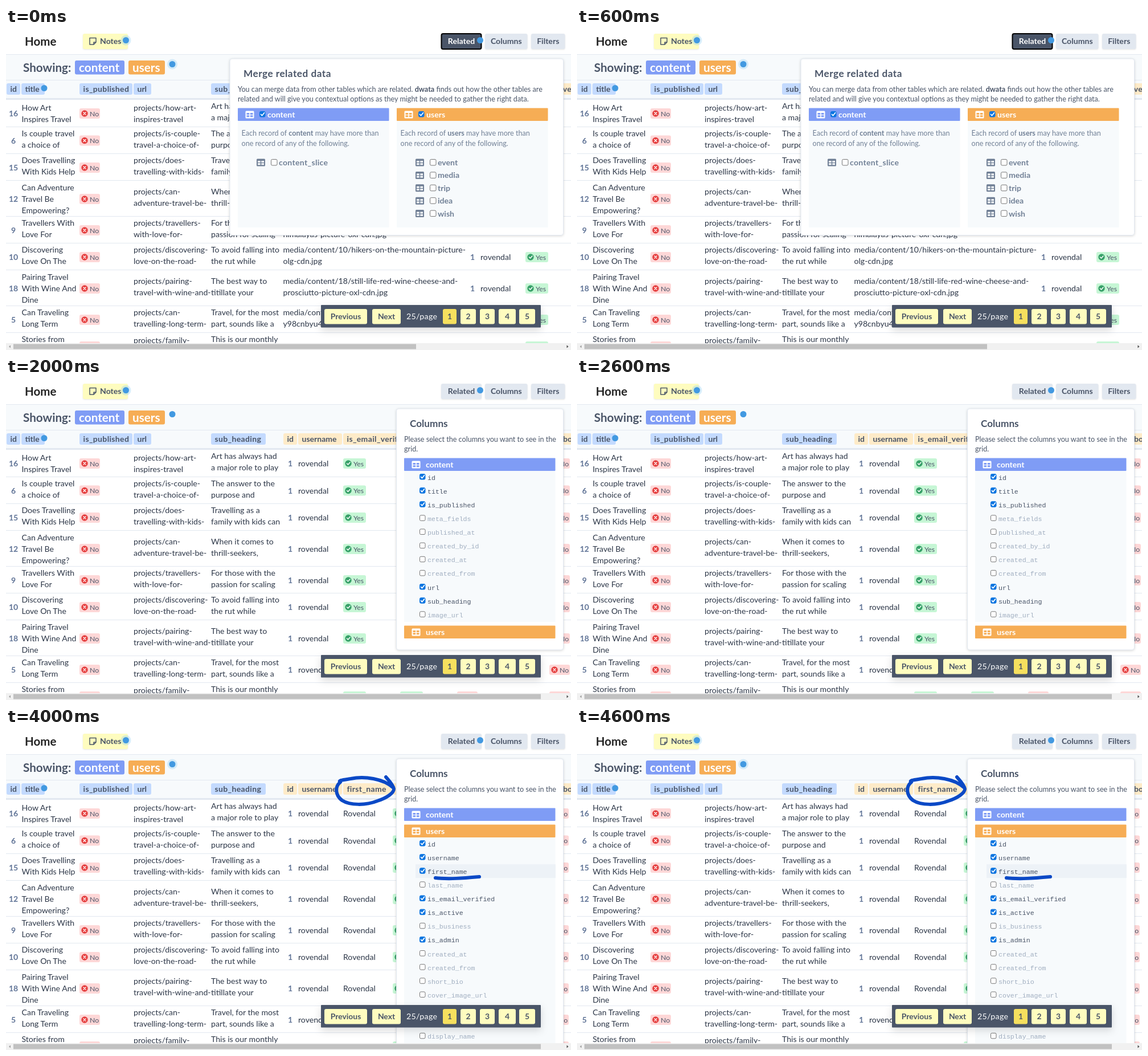
Recreate the animation shown at these times as an HTML page. Size 992 px wide and 565 px high, loop 5 s.

```html
<!DOCTYPE html>
<html lang="en">
<head>
<meta charset="utf-8">
<title>Data grid</title>
<style>
html, body { margin: 0; width: 100%; height: 100%; overflow: hidden; background: #fff; }
svg { display: block; width: 992px; height: 565px; }
text { font-family: Lato, "Open Sans", sans-serif; white-space: pre; }
.mono { font-family: "Liberation Mono", "Courier New", monospace; }
.card { filter: drop-shadow(0 1px 2px rgba(0, 0, 0, .16)); }
.lift { filter: drop-shadow(0 5px 7px rgba(0, 0, 0, .14)); }
.soft { filter: drop-shadow(0 1px 1px rgba(0, 0, 0, .1)); }
</style>
</head>
<body>
<svg id="stage" viewBox="0 0 992 565"></svg>
<script>
const INK = '#2d3748', SLATE = '#4a5568', GREY = '#718096', FADED = '#a0aec0';
const LINE = '#e2e8f0', PALE = '#f7fafc', BLUE = '#c3dafe', SAND = '#feebc8';
const INDIGO = '#7f9cf5', ORANGE = '#f6ad55', CREAM = '#fefcbf', PEN = '#0b49c6';
const USER = 'rovendal', USER_NAME = 'Rovendal';

// centre, id, title lines, url lines, sub heading lines
const rows = [
  [150, 16, 'How Art|Inspires Travel', 'projects/how-art-|inspires-travel', 'Art has always had|a major role to play'],
  [197.5, 6, 'Is couple travel|a choice of', 'projects/is-couple-|travel-a-choice-of-', 'The answer to the|purpose and'],
  [245, 15, 'Does Travelling|With Kids Help', 'projects/does-|travelling-with-kids-', 'Travelling as a|family with kids can'],
  [300, 12, 'Can Adventure|Travel Be|Empowering?', 'projects/can-|adventure-travel-be-', 'When it comes to|thrill-seekers,'],
  [355, 9, 'Travellers With|Love For', 'projects/travellers-|with-love-for-', 'For those with the|passion for scaling'],
  [402, 10, 'Discovering|Love On The', 'projects/discovering-|love-on-the-road-', 'To avoid falling into|the rut while'],
  [457, 18, 'Pairing Travel|With Wine And|Dine', 'projects/pairing-|travel-with-wine-and-', 'The best way to|titillate your'],
  [512, 5, 'Can Traveling|Long Term', 'projects/can-|travelling-long-term-', 'Travel, for the most|part, sounds like a'],
  [559, '', 'Stories from', 'projects/family-', 'This is our monthly']
];
const images = {
  4: '|himalayas-picture-oxl-cdn.jpg',
  5: 'media/content/10/hikers-on-the-mountain-picture-|olg-cdn.jpg',
  6: 'media/content/18/still-life-red-wine-cheese-and-|prosciutto-picture-oxl-cdn.jpg',
  7: 'media/content/5/|y98cnbyu4r'
};
const contentFields = 'id title is_published meta_fields published_at created_by_id created_at created_from url sub_heading image_url'.split(' ');
const userFields = 'id username first_name last_name is_email_verified is_active is_business is_admin created_at created_from short_bio cover_image_url avatar_url time_zone display_name'.split(' ');

const rect = (x, y, w, h, fill, r = 0, extra = '') =>
  `<rect x="${x}" y="${y}" width="${w}" height="${h}" rx="${r}" fill="${fill}" ${extra}/>`;
const circle = (x, y, r, fill, extra = '') => `<circle cx="${x}" cy="${y}" r="${r}" fill="${fill}" ${extra}/>`;
const path = (d, color, width) =>
  `<path d="${d}" fill="none" stroke="${color}" stroke-width="${width}" stroke-linecap="round" stroke-linejoin="round"/>`;
const text = (x, y, str, size = 14.1, fill = INK, extra = '') =>
  `<text x="${x}" y="${y}" font-size="${size}" fill="${fill}" ${extra}>${str}</text>`;
const bold = (x, y, str, size = 14, fill = SLATE, gap = 0, extra = '') =>
  text(x, y, str, size, fill, `font-weight="700" letter-spacing="${gap}" ${extra}`);
const mid = 'text-anchor="middle"';
const lines = (x, y, str, step = 20, size, fill) =>
  str.split('|').map((s, i) => text(x, y + i * step, s, size, fill)).join('');

function dot(x, y, halo) {
  return (halo ? circle(x, y, 9, '#90cdf4', 'opacity=".35"') : '') + circle(x, y, 5.5, '#4299e1');
}

function button(x, w, label, fill, color = SLATE) {
  return rect(x, 10, w, 27, fill, 3, 'class="soft"') + bold(x + w / 2, 28, label, 14.1, color, 0, mid);
}

function pill(x, y, yes) {
  const icon = yes ? `M${x + 6.5} ${y}l2 2 3.5-4` : `M${x + 7} ${y - 2}l4 4m0-4l-4 4`;
  return rect(x, y - 9, yes ? 40 : 36, 18, yes ? '#c6f6d5' : '#fed7d7', 3) +
    circle(x + 9, y, 5.7, yes ? '#38a169' : '#e53e3e') + path(icon, '#fff', 1.5) +
    text(x + 18, y + 4.5, yes ? 'Yes' : 'No', 12.3, SLATE);
}

function head(x, w, label, fill) {
  const gap = label.includes('_') ? .35 : 0;
  return rect(x, 97, w, 20, fill, 3) + bold(x + 6.5, 112, label, 14, SLATE, gap);
}

function tableIcon(x, y, fill, hole) {
  let s = rect(x, y - 6.5, 15, 13, fill, 1.5);
  for (const dx of [2, 8.3]) for (const dy of [-3, 1.2]) s += rect(x + dx, y + dy, 4.7, 3, hole);
  return s;
}

function checkbox(x, y, on, size = 10) {
  const box = rect(x + .5, y - size / 2, size - .5, size - .5, on ? '#0b75e0' : '#fff', 2,
    `stroke="${on ? '#0b75e0' : '#767676'}"`);
  return box + (on ? path(`M${x + 2.5} ${y}l2 2.2 4-5`, '#fff', 1.7) : '');
}

function band(x, y, label, fill, check) {
  return rect(x, y, 265.5, 22.5, fill, 1) + tableIcon(x + 13.5, y + 11.5, '#fff', fill) +
    (check ? checkbox(x + 38, y + 11, true) : '') +
    bold(x + (check ? 52 : 38), y + 16.5, label, 14.1, '#fff');
}

function grid(state) {
  const wide = state < 2;
  let s = rect(0, 47, 992, 76, PALE) + rect(0, 46, 992, 1, LINE) + rect(0, 91, 992, 1, LINE) +
    rect(0, 123, 992, 3, LINE);
  for (const y of [173, 220, 267, 330, 377, 424, 487, 534]) s += rect(0, y, 992, 1, LINE);

  s += head(1, 24, 'id', BLUE) + head(27, 41, 'title', BLUE) + head(129, 93, 'is_published', BLUE) +
    head(224, 31, 'url', BLUE) + head(360, 96, 'sub_heading', BLUE);
  if (wide) s += head(912, 130, 'is_email_verified', SAND);
  else {
    s += head(487, 24, 'id', SAND) + head(513, 77, 'username', SAND);
    s += state === 4 ? head(592, 85, 'first_name', SAND) : head(592, 130, 'is_email_verified', SAND);
    if (state === 4) s += head(679, 130, 'is_email_verified', SAND);
    s += state === 3 ? rect(989, 97, 20, 20, SAND, 3) : head(971.5, 60, 'bo', SAND);
  }

  rows.forEach(([c, id, title, url, sub], i) => {
    const top = c - 8, first = i ? top : top + 3, last = i === 8;
    const three = title.split('|').length === 3;
    s += bold(13, c + 5, id, 14, '#5f7396', 0, mid) + lines(27.5, three ? c - 15 : first, title) +
      pill(129, c, false) + lines(224, last ? first + 2 : first, url) + lines(360, top, sub);
    if (wide) s += lines(486.5, top, images[i] || '');
    if (!last) {
      s += bold(wide ? 819 : 499, c + 5, '1', 14, '#5f7396', 0, mid) + text(wide ? 833 : 513, c + 5, USER);
      if (state === 4) s += text(592, c + 5, USER_NAME);
    }
    s += pill(wide ? 912 : state === 4 ? 679 : 592, c, true);
    if (state === 2) s += pill(692, c, true) + pill(792, c, false) + pill(954, c, false);
    if (state === 3) s += pill(989, c, false) + (last ? '' : text(986.5, c + 15, '5', 14.1, INK, 'text-anchor="end"'));
    if (state === 4) s += pill(952, c, false);
  });
  return s;
}

function header(state) {
  const pick = on => on ? [SLATE, '#fff'] : [LINE, SLATE];
  const focus = state === 0 ? rect(764.5, 10, 70, 27, 'none', 3, 'stroke="#000" stroke-width="2"') : '';
  return bold(33, 30.5, 'Home', 20.5, '#222') +
    rect(135, 10, 79, 27, CREAM, 3, 'class="soft"') +
    path('M147 17.5h11v7.5l-4 4h-7zM154 29v-4h4', SLATE, 1.5) +
    bold(165, 28, 'Notes', 14.1) + dot(210.5, 21.5, state !== 3) +
    button(764, 71, 'Related', ...pick(state === 0)) + focus + dot(832.5, 21.5, false) +
    button(841, 74.5, 'Columns', ...pick(state === 1)) + button(922, 59.5, 'Filters', LINE) +
    bold(30, 76.5, 'Showing:', 20.7) +
    rect(121, 57, 87, 24.5, INDIGO, 3) + bold(128, 76.5, 'content', 20.7, '#fff') +
    rect(215, 57, 64, 24.5, ORANGE, 3) + bold(222, 76.5, 'users', 20.7, '#fff') +
    dot(292, 63.5, state !== 2) + dot(67, 105.5, false);
}

const panel = (x, h) => rect(x, 54, 978.5 - x, h, '#fff', 4, `stroke="${LINE}" class="card"`);

function mergePanel() {
  let s = panel(393, 309.5) + bold(417, 85.5, 'Merge related data', 17.2, SLATE, .5) +
    text(407, 111.5, 'You can merge data from other tables which are related. <tspan font-weight="700">dwata</tspan> finds out how the other tables are', 12.6, SLATE) +
    text(407, 129, 'related and will give you contextual options as they might be needed to gather the right data.', 12.6, SLATE);
  const groups = [[407, 'content', INDIGO, ['content_slice']],
    [686, 'users', ORANGE, ['event', 'media', 'trip', 'idea', 'wish']]];
  for (const [x, name, color, items] of groups) {
    s += rect(x, 141, 265.5, 209, PALE) + band(x, 140.5, name, color, true) +
      text(x + 6.5, 188.5, `Each record of <tspan font-weight="700">${name}</tspan> may have more than`, 12.6, GREY) +
      text(x + 6.5, 206.5, 'one record of any of the following.', 12.6, GREY);
    items.forEach((item, i) => {
      const y = 236 + i * 22.4;
      s += tableIcon(x + 33, y, GREY, PALE) + checkbox(x + 58, y, false, 11) +
        bold(x + 72, y + 5, item, 14.1, GREY, item.includes('_') ? .3 : 0);
    });
  }
  return s;
}

function fieldList(fields, on, y0, hover) {
  return fields.map((name, i) => {
    const y = y0 + i * 24.13, checked = on.includes(i);
    return (i === hover ? rect(719, y - 12, 246, 24, '#edf2f7') : '') + checkbox(726, y - .5, checked) +
      text(740, y + 4.5, name, 11.6, checked ? SLATE : FADED, 'class="mono"');
  }).join('');
}

function columnsPanel(state) {
  const open = state > 2;
  const s = panel(685.5, open ? 540 : 423) + bold(709, 85.5, 'Columns', 17.2) +
    lines(699, 111.5, 'Please select the columns you want to see in the|grid.', 17.5, 12.6, SLATE) +
    (open ? rect(699, 192, 265.5, 373, PALE) : rect(699, 163, 265.5, 265, PALE)) +
    band(699, 140.5, 'content', INDIGO) + band(699, open ? 169.5 : 434.5, 'users', ORANGE);
  if (!open) return s + fieldList(contentFields, [0, 1, 2, 8, 9], 174);
  return s + (state === 3 ? fieldList(userFields, [0, 1, 4, 5, 7, 8], 203)
    : fieldList(userFields, [0, 1, 2, 4, 5, 7], 203, 2));
}

function pager() {
  const keys = [[559, 75, 'Previous'], [643, 50, 'Next'], [767, 24, '1'], [798, 27, '2'],
    [832, 26, '3'], [865, 30, '4'], [901, 28, '5']];
  return rect(553, 486, 386, 39.5, SLATE, 1, 'class="lift"') + text(703, 511, '25/page', 14.2, '#fff', 'letter-spacing=".3"') +
    keys.map(([x, w, label]) => rect(x, 493, w, 26.5, label === '1' ? '#f6e05e' : CREAM, 3) +
      bold(x + w / 2, 511, label, 13.9, SLATE, 0, mid)).join('');
}

function scrollbar(end) {
  return rect(0, 553, 992, 12, '#f1f1f1') + rect(13, 554.5, end - 13, 9, '#c1c1c1') +
    '<path d="M8 556.5v5l-3-2.5z" fill="#a3a3a3"/><path d="M984.5 556.5v5l3-2.5z" fill="#505050"/>';
}

const scribble = () =>
  path('M667 86C673 93 680 100 681 107C681 114 668 123 652 128C632 136 604 136 590 127C578 118 577 103 587 95C582 92 592 91 605 89C630 84 662 89 679 104', PEN, 6) +
  path('M754 263C778 265.5 802 263.5 831 261', PEN, 6);

function draw(state) {
  document.getElementById('stage').innerHTML = grid(state) + header(state) +
    (state < 2 ? mergePanel() : columnsPanel(state)) + pager() +
    scrollbar([720, 720, 939, 908, 939][state]) + (state === 4 ? scribble() : '');
}

let shown = -1;
function tick() {
  const state = Math.floor(performance.now() / 1000) % 5;
  if (state !== shown) draw(shown = state);
  requestAnimationFrame(tick);
}
tick();
</script>
</body>
</html>
```
